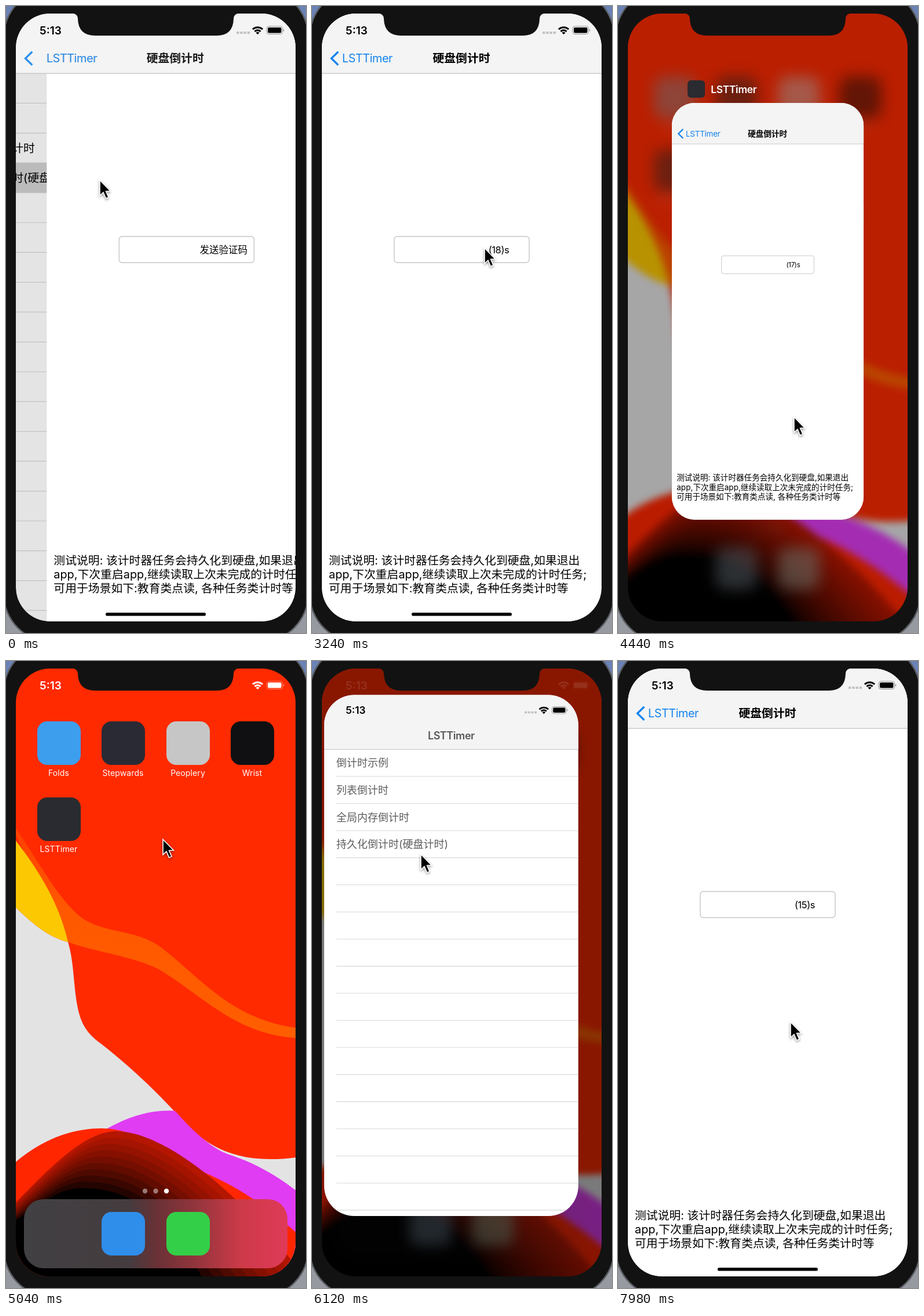
Write an HTML page that moves like this. It is 518 px wide and 1080 px high and loops after 8000 ms.

```html
<!DOCTYPE html>
<html lang="zh-CN">
<head>
<meta charset="utf-8">
<title>Countdown demo</title>
<style>
html, body { margin: 0; width: 100%; height: 100%; overflow: hidden; }
svg { display: block; width: 100vw; height: 100vh; }
text { font: 19.83px Inter, 'Noto Sans CJK SC', 'Noto Sans CJK', sans-serif; white-space: pre; }
.mid { text-anchor: middle; }
.bold { font-weight: 600; }
.tight { letter-spacing: -.45px; }
.label { font-size: 14px; fill: #fff; letter-spacing: .1px; }
</style>
</head>
<body>
<svg viewBox="0 0 518 1080">
  <defs>
    <linearGradient id="desk" x2="0" y2="1"><stop stop-color="#6b82b6"/><stop offset="1" stop-color="#979aa0"/></linearGradient>
    <linearGradient id="glass">
      <stop stop-color="#414043"/><stop offset=".4" stop-color="#453c3f"/>
      <stop offset=".5" stop-color="#683136"/><stop offset=".66" stop-color="#95353d"/>
      <stop offset=".82" stop-color="#cc3a48"/><stop offset="1" stop-color="#e03a58"/>
    </linearGradient>
    <linearGradient id="ember" x1="0" y1="0" x2="-.25" y2="1">
      <stop stop-color="#ff3c00"/><stop offset=".35" stop-color="#ff5800"/><stop offset="1" stop-color="#ff6200"/>
    </linearGradient>
    <clipPath id="screen"><rect x="17" y="13" width="483" height="1047" rx="59"/></clipPath>
    <clipPath id="cardClip"><rect id="cardEdge" x="17" y="13" width="483" height="1047" rx="57"/></clipPath>
    <g id="status">
      <text class="bold" x="58" y="49" style="font-size:19px" fill="currentColor">5:13</text>
      <g fill="none" stroke="currentColor" stroke-width="3">
        <path d="M425.9 40.2a12.5 12.5 0 0 1 17.2 0M429.4 43.8a7.5 7.5 0 0 1 10.2 0"/>
      </g>
      <path d="M431.5 45.9a4.2 4.2 0 0 1 6 0l-3 3z" fill="currentColor"/>
      <rect x="450" y="35" width="27.5" height="13.5" rx="4" fill="none" stroke="currentColor" opacity=".4"/>
      <rect x="452" y="37" width="23.5" height="9.5" rx="2.3" fill="currentColor"/>
      <path d="M479 39.5q2.5 2.2 0 4.6z" fill="currentColor" opacity=".5"/>
    </g>
  </defs>

  <rect width="518" height="1080" fill="url(#desk)"/>
  <rect x="-4" y="-30" width="526" height="1126" rx="84" fill="#121212" stroke="#5c5f65" stroke-width="2.5"/>

  <g clip-path="url(#screen)">
    <g id="home">
      <g id="paper">
        <rect width="518" height="1080" fill="#ff2a00"/>
        <path fill="#e3e3e4" d="M0 408C40 448 70 475 107 484C118 520 116 560 124 598C131 632 146 646 165 660C210 695 255 737 290 775C330 825 380 858 455 858Q490 858 518 852V1080H0Z"/>
        <path fill="url(#ember)" d="M0 264C55 340 85 405 130 442C170 470 225 462 266 492C340 548 390 622 518 634V650C400 650 340 575 262 530C210 506 160 503 107 484Z"/>
        <path fill="#fcc802" d="M0 288C50 350 90 410 107 484C70 475 40 448 0 408Z"/>
        <path fill="#e03cf4" d="M170 808C210 785 250 772 292 775C340 830 370 845 385 850C430 865 470 886 518 926V1080H170Z"/>
        <path fill="#ff2600" d="M0 878C60 820 120 805 165 805C230 805 300 860 340 880C400 905 460 945 518 1000V1080H0Z"/>
        <g id="dunes"></g>
      </g>
      <g id="icons">
        <rect id="dock" x="31" y="927" width="455" height="119" rx="34" fill="url(#glass)"/>
      </g>
      <rect id="shade" width="518" height="1080"/>
      <use id="homeStatus" href="#status" color="#fff"/>
    </g>

    <g id="app">
      <g id="header">
        <rect x="56.5" y="-44" width="44" height="44" rx="9" fill="#2a2b30"/>
        <text class="bold tight" x="115" y="-25" fill="#fff" dy="13" style="font-size:25.5px">LSTTimer</text>
      </g>
      <g clip-path="url(#cardClip)">
        <g id="list">
          <rect width="700" height="1080" fill="#fff"/>
          <rect id="picked" y="270" width="700" height="51.4" fill="#d1d1d1"/>
          <g id="lines"></g>
          <g id="rows"></g>
        </g>
        <rect id="dim" width="518" height="1080"/>
        <g id="detail">
          <rect x="17" width="483" height="1080" fill="#fff"/>
          <rect x="142" y="397" width="233" height="45" rx="5" fill="#fff" stroke="#c6c6c6" stroke-width="1.4"/>
          <text id="code" class="mid" x="322.5" y="426.3" style="font-size:16.5px"></text>
          <text x="29" y="961.5">测试说明: 该计时器任务会持久化到硬盘,如果退出</text>
          <text x="29" y="985.5">app,下次重启app,继续读取上次未完成的计时任务;</text>
          <text x="29" y="1009.5">可用于场景如下:教育类点读, 各种任务类计时等</text>
        </g>
        <rect width="518" height="116" fill="#f4f4f4"/>
        <path d="M0 116.2H518" stroke="#c2c2c2" stroke-width="1.2"/>
        <text id="listTitle" class="bold mid tight" y="97">LSTTimer</text>
        <g id="back" fill="#1484ee">
          <path d="M45.3 78.8L33.5 90.3L45.3 101.8" fill="none" stroke="#1484ee" stroke-width="3.3"/>
          <text id="backText" class="tight" y="97">LSTTimer</text>
          <text id="title" class="bold mid" y="97" fill="#000">硬盘倒计时</text>
        </g>
        <g id="appStatus">
          <use href="#status" color="#000"/>
          <path d="M398 46H421" stroke="#c2c2c2" stroke-width="4" stroke-dasharray="4.4 1.8"/>
        </g>
        <rect id="bar" x="172" y="1045" width="173" height="5.6" rx="2.8"/>
        <rect id="tile" width="518" height="1080" fill="#2a2b30"/>
      </g>
    </g>
  </g>
  <path d="M112 12Q124 13 124 22Q125 51 154 51H364Q392 51 393 22Q393 13 405 12Z" fill="#121212"/>
  <path id="pointer" d="M0 0V26.5L6 21L10.5 31.5L15 29.5L10.6 19.3L18.3 18.8Z" stroke="#fff" stroke-width="1.6"
    style="filter:drop-shadow(0 2px 2px #0006)"/>
</svg>
<script>
const $ = id => document.getElementById(id);
const set = (id, attrs) => { for (const k in attrs) $(id).setAttribute(k, attrs[k]); };
const add = (id, markup) => $(id).insertAdjacentHTML('beforeend', markup);
const clamp = v => Math.min(1, Math.max(0, v));
const smooth = (a, b, t) => { const u = clamp((t - a) / (b - a)); return u * u * (3 - 2 * u); };
// critically damped spring from 0 to 1, t in ms
const spring = (t, w) => {
  if (t < 0) return 0;
  const x = t * w / 1000, v = 1 - (1 + x) * Math.exp(-x);
  return v > .995 ? 1 : v;
};
const zoom = (s, cx, cy) => `translate(${cx} ${cy}) scale(${s}) translate(${-cx} ${-cy})`;

for (let k = 0; k < 10; k++) {
  const u = k / 9, glow = (1 - u) ** .75, top = 810 + 98 * u;
  add('dunes', `<path fill="rgb(${180 * glow},${22 * glow},0)" d="M0 ${950 + 25 * u}C60 ${890 + 45 * u} ${130 - 40 * u} ${top} ${190 - 60 * u} ${top}C${280 - 40 * u} ${top} ${420 - 130 * u} ${930 + 50 * u} ${530 - 180 * u} 1080H0Z"/>`);
}

const icon = (x, y, color, name = '') => add('icons',
  `<rect x="${x}" y="${y}" width="75" height="75" rx="17" fill="${color}"/>
   <text class="label mid" x="${x + 37}" y="${y + 94}">${name}</text>`);
icon(54, 104, '#3d9eee', 'Folds');
icon(165, 104, '#2a2a35', 'Stepwards');
icon(277, 104, '#c6c6c6', 'Peoplery');
icon(388, 104, '#101012', 'Wrist');
icon(54, 235, '#2a2b30', 'LSTTimer');
icon(165, 949, '#2f8eea');
icon(277, 949, '#34cf48');
[240, 258.5, 277].forEach((x, i) =>
  add('icons', `<circle cx="${x}" cy="913" r="4.2" fill="#fff" opacity="${i < 2 ? .45 : 1}"/>`));

const rowY = i => 116 + 51.4 * i;
['倒计时示例', '列表倒计时', '全局内存倒计时', '持久化倒计时(硬盘计时)'].forEach((s, i) =>
  add('rows', `<text x="40" y="${rowY(i) + 33.2}">${s}</text>`));
for (let i = 1; i < 19; i++)
  add('lines', `<path d="M40 ${rowY(i)}H700" stroke="#d8d8d8" stroke-width="1.2"/>`);

// time, x, y
const path = [
  [0, 162, 300], [350, 164, 302], [950, 325, 424], [1700, 325, 424], [2300, 298, 417],
  [3280, 298, 417], [3720, 292, 1046], [4250, 304, 708], [4620, 304, 708], [4880, 292, 300],
  [5450, 184, 337], [5540, 184, 337], [5700, 106, 290], [5820, 106, 290], [6110, 188, 333],
  [6500, 190, 304], [6880, 190, 304], [7650, 298, 622], [8000, 298, 622]
];
function pointerAt(t) {
  const i = path.findIndex(p => p[0] > t);
  const [a, ax, ay] = path[i - 1], [b, bx, by] = path[i], u = smooth(a, b, t);
  return [ax + (bx - ax) * u, ay + (by - ay) * u];
}

const PRESS = 1150;
function caption(t) {
  if (t < PRESS) return '发送验证码';
  const left = t < 5000 ? 20 - Math.floor((t - PRESS) / 1000) : t < 7150 ? 16 : 15;
  return `(${left})s`;
}

function draw(now) {
  const t = now % 8000, first = t < 5000;
  const shrink = first ? smooth(3740, 4250, t) : 0;
  const kill = smooth(4640, 4900, t);
  const open = spring(t - 5800, 11.8);
  const rest = 1 - (first ? spring(t + 250, 15) : spring(t - 6800, 15));
  const shown = 1 - rest;

  // home screen behind the app
  const soft = first ? shrink * (1 - smooth(4850, 5000, t)) : open;
  $('home').style.display = (first ? shrink > 0 : open < 1) ? '' : 'none';
  set('paper', { transform: zoom(1 + .09 * soft, 310, 520) });
  set('icons', { transform: zoom(1 - .04 * soft, 258, 540), opacity: 1 - .5 * soft });
  $('paper').style.filter = soft ? `blur(${6 * soft}px)` : '';
  $('icons').style.filter = soft ? `blur(${13 * soft}px) saturate(${1 - .9 * soft})` : '';
  set('dock', { opacity: 1 - soft });
  set('shade', { opacity: soft * (first ? .27 : .52) });
  set('homeStatus', { opacity: 1 - soft });

  // app card
  $('app').style.display = t < 4900 || t > 5800 ? '' : 'none';
  let x, y, s, h;
  if (first) {
    s = 1 - .3145 * shrink;
    x = 17 + 76 * shrink;
    y = 13 + 154 * shrink - 900 * kill;
    h = 1047;
  } else {
    s = (75 + 408 * open) / 483;
    x = 54 - 37 * open;
    y = 235 - 222 * open ** 2;
    h = (310 + 750 * open ** 1.3 - y) / s;
  }
  set('app', { transform: `translate(${x} ${y}) scale(${s}) translate(-17 -13)` });
  set('cardEdge', { height: h });
  set('header', { opacity: smooth(.6, 1, shrink) });
  set('appStatus', { opacity: 1 - shrink });
  set('bar', { opacity: first ? 1 - shrink : +(open === 1) });
  set('tile', { opacity: first ? 0 : clamp(1 - 3 * open) });

  // push from list to detail
  const fade = first ? 1 : clamp((t - 6000) / 190);
  set('list', { transform: `translate(${-145 * shown} 0)` });
  set('rows', { opacity: fade });
  set('picked', { opacity: +(first || t > 6700) });
  set('dim', { opacity: .12 * shown });
  set('detail', { transform: `translate(${483 * rest} 0)` });
  set('listTitle', { x: 258.5 - 163 * shown, opacity: rest * fade });
  set('back', { opacity: shown });
  set('backText', { x: 52 + 163 * rest });
  set('title', { x: 258 + 310 * rest });

  const text = caption(t);
  if ($('code').textContent !== text) $('code').textContent = text;
  $('code').style.letterSpacing = text[0] === '(' ? '-.4px' : '0';
  set('code', { opacity: t < PRESS ? 1 - .8 * smooth(1060, PRESS, t) : first ? clamp(.3 + (t - PRESS) / 260) : 1 });

  set('pointer', { transform: `translate(${pointerAt(t)})` });
  requestAnimationFrame(() => draw(performance.now()));
}
draw(0);
</script>
</body>
</html>
```
